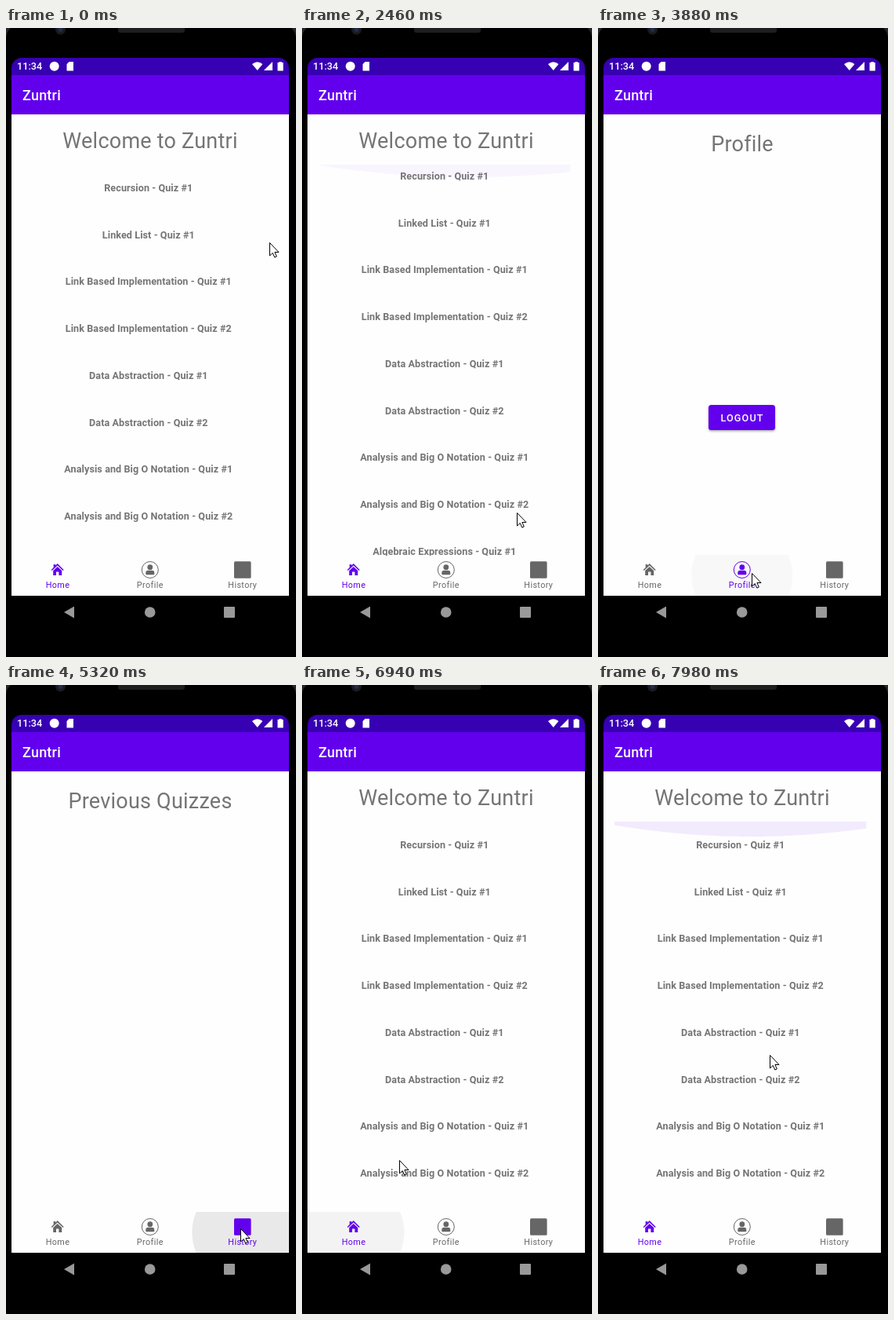
An HTML page with a canvas for the animation above (8000 ms loop, 370 px wide and 801 px high).

```html
<!DOCTYPE html>
<html lang="en">
<head>
<meta charset="utf-8">
<title>Quiz app demo</title>
<style>
  html, body { margin: 0; width: 100%; height: 100%; overflow: hidden; background: #000; }
  canvas { display: block; }
</style>
</head>
<body>
<canvas id="stage" width="370" height="801"></canvas>
<script>
const ctx = document.getElementById('stage').getContext('2d');
const LOOP = 8000;
const STEP = LOOP / 60;   // the screen refreshes 60 times per loop; all times below are in steps
const APP = 'Zuntri';
const PURPLE = '#6200ee', GREY = '#666', TEXT = '#757575', WHITE = '#fefefe', NAV = '#999';
const QUIZZES = [
  'Recursion - Quiz #1', 'Linked List - Quiz #1',
  'Link Based Implementation - Quiz #1', 'Link Based Implementation - Quiz #2',
  'Data Abstraction - Quiz #1', 'Data Abstraction - Quiz #2',
  'Analysis and Big O Notation - Quiz #1', 'Analysis and Big O Notation - Quiz #2',
  'Algebraic Expressions - Quiz #1'
];
const TABS = [
  { name: 'Home', x: 66, press: 48, release: 50.6 },
  { name: 'Profile', x: 183.8, press: 25.5, release: 27 },
  { name: 'History', x: 301.8, press: 37, release: 40.3 }
];
const MOVES = [
  { from: 0, to: 2, x: 336, y: 289 },
  { from: 6, to: 12, x: 288, y: 578 },
  { from: 15, to: 18, x: 274, y: 617 },
  { from: 18, to: 23, x: 262, y: 673 },
  { from: 23, to: 26, x: 196, y: 694 },
  { from: 29, to: 36, x: 299, y: 692 },
  { from: 41, to: 47, x: 74, y: 704 },
  { from: 50, to: 55, x: 215, y: 424 },
  { from: 55, to: 60, x: 219, y: 471 }
];

const progress = (t, a, b) => Math.min(1, Math.max(0, (t - a) / (b - a)));
function ease(t, a, b) {
  const p = progress(t, a, b);
  return p * p * (3 - 2 * p);
}
const pulse = (t, start, peak, end) => ease(t, start, peak) - ease(t, peak, end);

function cursorAt(t) {
  let x = 336, y = 273;
  for (const move of MOVES) {
    const p = ease(t, move.from, move.to);
    x += (move.x - x) * p;
    y += (move.y - y) * p;
  }
  return { x, y };
}

function text(str, x, y, font, color, spacing = 0, align = 'center') {
  ctx.font = font + ' Roboto, sans-serif';
  ctx.letterSpacing = spacing + 'px';
  ctx.textAlign = align;
  ctx.fillStyle = color;
  ctx.fillText(str, x, y);
}
function rect(x, y, w, h, color, radius = 0) {
  ctx.fillStyle = color;
  ctx.beginPath();
  ctx.roundRect(x, y, w, h, radius);
  ctx.fill();
}
function disc(x, y, r, color) {
  ctx.fillStyle = color;
  ctx.beginPath();
  ctx.arc(x, y, r, 0, Math.PI * 2);
  ctx.fill();
}
function shape(d, color, x = 0, y = 0, stroke) {
  const path = new Path2D(d);
  ctx.save();
  ctx.translate(x, y);
  ctx.fillStyle = color;
  ctx.fill(path);
  if (stroke) { ctx.strokeStyle = stroke; ctx.stroke(path); }
  ctx.restore();
}
function clipped(x, y, w, h, draw) {
  ctx.save();
  ctx.beginPath();
  ctx.rect(x, y, w, h);
  ctx.clip();
  draw();
  ctx.restore();
}

function drawPhone() {
  rect(0, 0, 370, 801, '#000');
  shape('M0 0H6Q1 4 0 12ZM370 0H364Q369 4 370 12Z', '#25272b');
  disc(69.5, 2, 6.5, '#191b20');
  disc(69.5, 2, 3, '#232c48');
  rect(143, -5, 85, 11, '#1e1e1e', 3);

  rect(7, 38, 354, 22, '#3700b3', [13, 13, 0, 0]);
  rect(7, 60, 354, 50, PURPLE);
  rect(7, 110, 354, 613, WHITE);
  text('11:34', 14, 53, '500 12.7px', '#fff', 0, 'left');
  disc(61.7, 48.7, 6, '#fff');
  shape('M80.5 43H86V54.5H77.5V46Z', '#fff');
  shape('M320.7 54L314 46Q320.7 40.5 327.4 46Z', '#fff');
  shape('M329 54L340 43V54Z', '#fff');
  shape('M348.5 43H351.7V44H353.7V54.5H346.5V44H348.5Z', '#fff');
  text(APP, 21, 92, '500 18px', '#fff', .225, 'left');

  shape('M74 744L87 736.5V751.5Z', NAV);
  disc(183.7, 744, 6.8, NAV);
  rect(278, 737, 14, 14, NAV, 1);
}

// Overscroll glow: a shallow parabola that leans towards the pointer.
function drawGlow(edge, height, alpha, cursorX) {
  const peak = 181.5 + (cursorX - 181.5) * .36;
  const bulge = x => Math.max(0, 1 - .75 * ((x - peak) / 172.5) ** 2);
  ctx.fillStyle = `rgba(98,0,238,${alpha})`;
  ctx.beginPath();
  ctx.moveTo(21, edge);
  for (let x = 21; x <= 342.5; x += 1.5) ctx.lineTo(x, edge + height * bulge(x));
  ctx.lineTo(342.5, edge);
  ctx.fill();
}

function drawHome(t, cursorX) {
  heading('Welcome to ' + APP, 153);
  const scroll = 15 * pulse(t, 16, 18, 20) + 38.4 * pulse(t, 53, 55, 60);
  const nudge = pulse(t, 15, 18, 23), top = ease(t, 57, 60), bottom = pulse(t, 53, 55, 58);
  clipped(7, 174, 354, 498, () => {
    QUIZZES.forEach((name, i) =>
      text(name, 181.8, 208 + i * 59.7 - scroll, 'bold 12.6px', TEXT, .08));
    drawGlow(174, 16 * nudge, .035 * nudge, cursorX);
    drawGlow(174, 19 * top, .078 * top, cursorX);
    drawGlow(672, -36 * bottom, .12 * bottom, cursorX);
  });
}

function drawProfile() {
  heading('Profile', 157);
  ctx.save();
  ctx.shadowColor = 'rgba(0,0,0,.35)';
  ctx.shadowBlur = 3;
  ctx.shadowOffsetY = 1.5;
  rect(141, 480, 85, 32, PURPLE, 3.5);
  ctx.restore();
  text('LOGOUT', 184, 500.7, '500 12.6px', '#fff', 1.12);
}

const drawHistory = () => heading('Previous Quizzes', 157);
const heading = (str, y) => text(str, 184, y, '27px', TEXT, .225);

// A press spreads from the pointer towards the middle of its tab, then fades.
function drawRipple(t, { x, press, release }) {
  if (t < press) return;
  const p = progress(t, press, press + 2.7);
  const fade = progress(t, release, release + 2.8);
  const start = cursorAt(press);
  disc(start.x + (x - start.x) * p, start.y + 3 + (694 - start.y) * p, 20 + 44.5 * p,
    `rgba(0,0,0,${.083 * (1 - fade)})`);
}

function drawTabs(t, page) {
  rect(7, 672, 354, 51, WHITE);
  clipped(7, 671, 354, 52, () => TABS.forEach(tab => drawRipple(t, tab)));
  const [home, profile, history] = TABS.map((tab, i) => {
    const color = i === page ? PURPLE : GREY;
    text(tab.name, tab.x, 713, '10.8px', color, .38);
    return color;
  });

  shape('M8 0L5.5 2.5V1H3V5L0 8L1 9L8 2.5L15 9L16 8Z', home, 57.7, 682);
  shape('M8 4L13.5 9V15H9.7V10.5H6.3V15H2.5V9Z', home, 57.7, 682);

  ctx.strokeStyle = profile;
  ctx.beginPath();
  ctx.arc(183.8, 690, 10.5, 0, Math.PI * 2);
  ctx.stroke();
  disc(183.8, 686.7, 3.4, profile);
  rect(178.3, 690.7, 11, 5.5, profile, [3, 3, 1, 1]);

  rect(291, 679.3, 21.6, 21.5, history, 1.5);
}

function draw(now) {
  const t = Math.floor(now % LOOP / STEP + .2);
  const { x, y } = cursorAt(t);
  const page = t < 27 || t >= 50 ? 0 : t < 39 ? 1 : 2;
  drawPhone();
  [drawHome, drawProfile, drawHistory][page](t, x);
  drawTabs(t, page);
  shape('M0 0V16.5L3.8 13L6.3 18.6L8.8 17.5L6.4 12H11.5Z', '#fff',
    Math.round(x) + .5, Math.round(y) + .5, '#000');
}

const begin = performance.now();
function loop() {
  draw(performance.now() - begin);
  requestAnimationFrame(loop);
}
loop();
</script>
</body>
</html>
```
